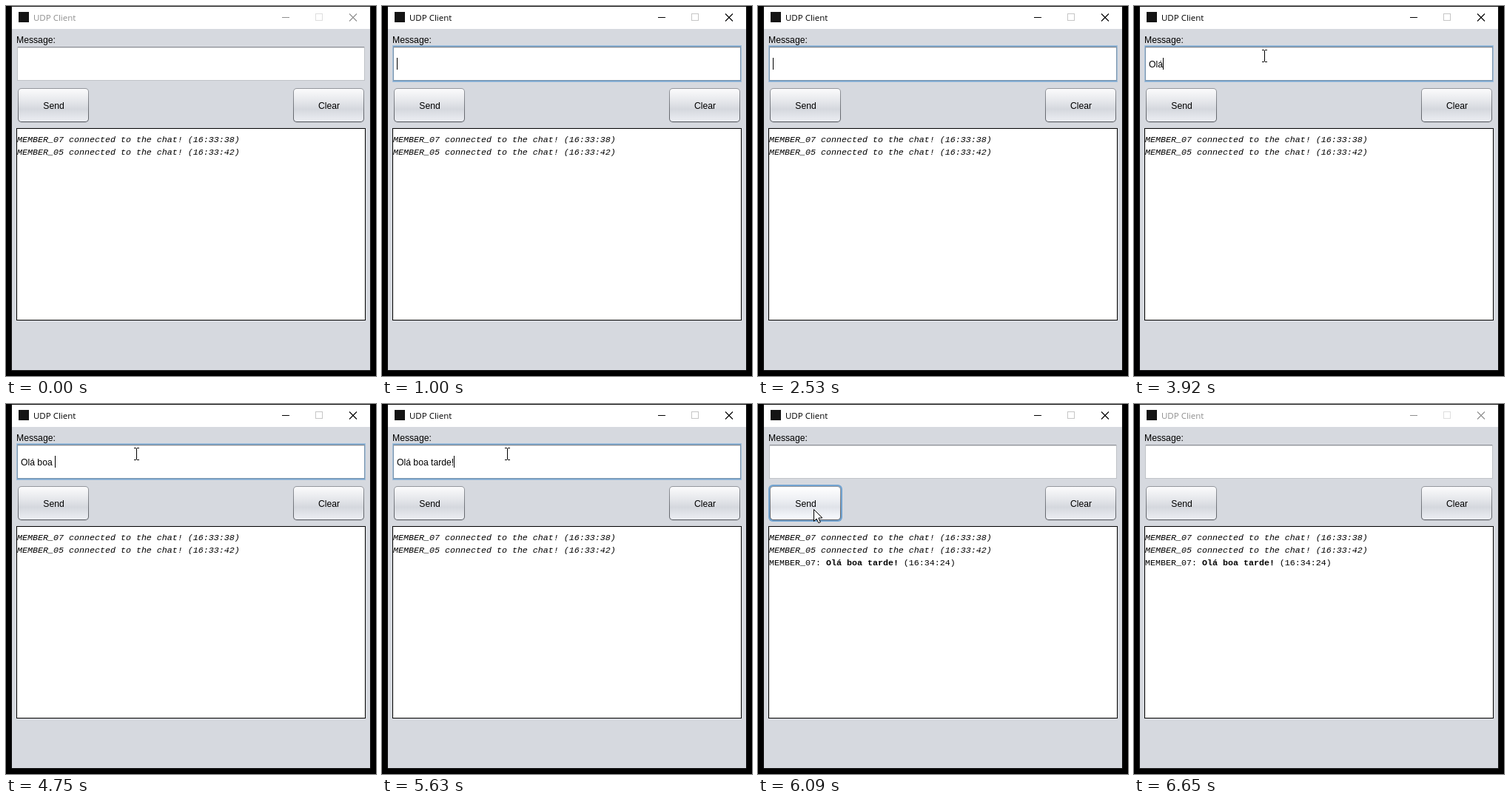
Recreate the animation shown at these times as an HTML page with a canvas. Size 500x500 px, loop 8 s.

```html
<!DOCTYPE html>
<html lang="en">
<head>
<meta charset="utf-8">
<title>UDP Client</title>
<style>
  html, body { margin: 0; width: 100%; height: 100%; overflow: hidden; background: #000; }
  canvas { display: block; width: 500px; height: 500px; }
</style>
</head>
<body>
<canvas id="stage" width="500" height="500"></canvas>
<script>
const ctx = document.getElementById('stage').getContext('2d');
const LOOP = 8000;
const SANS = '12.2px "Liberation Sans", Arial, sans-serif';
const MONO = '11.66px "Liberation Mono", "Courier New", monospace';
const TITLE = '11.5px "Open Sans", "Noto Sans", sans-serif';
const MESSAGE = 'Olá boa tarde!';

// [time, value...] steps; each holds until the next one
const ACTIVE = [[0, false], [1000, true], [1170, false], [2530, true], [6650, false]];
const FOCUS = [[0, 'field'], [5900, 'send']];
const TYPED = [[0, 0], [3530, 1], [3720, 2], [3920, 3], [4380, 4], [4470, 5], [4560, 6], [4650, 7],
  [4730, 8], [4820, 10], [4910, 11], [5000, 12], [5370, 13], [5550, 14], [6020, 0]];
const SEND = [[0, 'normal'], [5900, 'pressed'], [6020, 'hover'], [6180, 'normal']];
const POINTER = [[0, null],
  [1630, 'arrow', 397, 303], [1740, 'arrow', 455, 324], [1830, 'arrow', 424, 284],
  [1910, 'arrow', 358, 230], [2000, 'arrow', 296, 182], [2090, null],
  [2630, 'beam', 226, 84], [2720, 'beam', 208, 78], [2810, 'beam', 192, 72],
  [2900, 'beam', 181, 68], [2990, 'beam', 176, 67],
  [5630, 'beam', 169, 67], [5720, 'beam', 146, 84], [5810, 'arrow', 100, 122],
  [5900, 'arrow', 75, 142], [6100, 'arrow', 80, 146], [6180, null]];

const FACES = {
  normal: ['#fbfbfc', '#e4e6ea', '#d5d8de', '#eceef3'],
  hover: ['#ffffff', '#edeff3', '#e0e3e9', '#f9fbff'],
  pressed: ['#b9bfcb', '#a4abb9', '#99a1b0', '#b3bbc9']
};

function at(steps, t) {
  let found = steps[0];
  for (const step of steps) if (step[0] <= t) found = step;
  return found;
}

function rect(x, y, w, h, color) {
  ctx.fillStyle = color;
  ctx.fillRect(x, y, w, h);
}

function frame(x, y, w, h, color) {
  ctx.strokeStyle = color;
  ctx.lineWidth = 1;
  ctx.strokeRect(x + 0.5, y + 0.5, w - 1, h - 1);
}

function text(str, x, y, font, color = '#000', align = 'left') {
  ctx.font = font;
  ctx.fillStyle = color;
  ctx.textAlign = align;
  ctx.fillText(str, x, y);
}

function gradient(y0, y1, stops) {
  const g = ctx.createLinearGradient(0, y0, 0, y1);
  for (const [pos, color] of stops) g.addColorStop(pos, color);
  return g;
}

function rounded(x, y, w, h, r, fill) {
  ctx.beginPath();
  ctx.roundRect(x, y, w, h, r);
  ctx.fillStyle = fill;
  ctx.fill();
}

function drawWindow(active) {
  rect(0, 0, 500, 500, '#000');
  frame(7, 0, 486, 493, active ? '#0c0c0c' : '#1c1c1c');
  rect(8, 1, 484, 491, '#d6d9df');
  rect(8, 1, 484, 30, '#fff');
  rect(17, 8, 14, 14, '#141414');
  const ink = active ? '#000' : '#8f8f8f';
  text('UDP Client', 37, 20, TITLE, ink);
  rect(373, 15, 10, 1, ink);
  frame(418, 10, 10, 10, active ? '#c6c6c6' : '#dedede');
  ctx.strokeStyle = ink;
  ctx.lineWidth = 1.1;
  ctx.beginPath();
  ctx.moveTo(464, 10.5);
  ctx.lineTo(474, 20.5);
  ctx.moveTo(474, 10.5);
  ctx.lineTo(464, 20.5);
  ctx.stroke();
}

function drawField(str, focused, caret) {
  text('Message:', 14, 50, SANS);
  if (focused) {
    rect(14, 53, 472, 50, '#a3bfd9');
    rect(15, 54, 470, 48, '#73a4d1');
  }
  rect(15, 55, 470, 46, focused ? '#8097ad' : '#c0c3c8');
  rect(16, 55, 468, 1, '#8b8e94');
  rect(16, 56, 468, 44, '#fff');
  rect(16, 56, 468, 1, '#dcdde0');
  text(str, 20, 83, SANS);
  if (caret) rect(20 + Math.round(ctx.measureText(str).width), 70, 1, 16, '#000');
}

function drawButton(label, x, state, focused) {
  const y = 111, w = 96, h = 46, face = FACES[state], down = state === 'pressed';
  if (focused) rounded(x - 2, y - 2, w + 4, h + 4, 6, '#73a4d1');
  else rounded(x, y + 1, w, h, 5, '#c3c6cc');
  rounded(x, y, w, h, 5, down
    ? gradient(y, y + h, [[0, '#1c222c'], [1, '#5b6370']])
    : gradient(y, y + h, [[0, '#95989e'], [1, '#5a5d63']]));
  rounded(x + 1, y + 1, w - 2, h - 2, 4, gradient(y + 1, y + h - 1,
    [[0, face[0]], [0.4, face[1]], [0.62, face[2]], [1, face[3]]]));
  text(label, x + w / 2 + 0.5, 139, SANS, '#000', 'center');
}

function drawChat(sent) {
  rect(14, 165, 472, 260, '#000');
  rect(15, 166, 470, 258, '#fff');
  text('MEMBER_07 connected to the chat! (16:33:38)', 15, 184, 'italic ' + MONO);
  text('MEMBER_05 connected to the chat! (16:33:42)', 15, 201, 'italic ' + MONO);
  if (!sent) return;
  let x = 15;
  for (const [str, style] of [['MEMBER_07: ', ''], [MESSAGE, 'bold '], [' (16:34:24)', '']]) {
    text(str, x, 218, style + MONO);
    x += ctx.measureText(str).width;
  }
}

function drawArrow(x, y) {
  ctx.beginPath();
  ctx.moveTo(x + 0.5, y + 0.5);
  for (const [dx, dy] of [[0, 16], [3.6, 12.6], [6.4, 18.2], [8.8, 17.2], [6.3, 11.6], [11.4, 11.4]])
    ctx.lineTo(x + 0.5 + dx, y + 0.5 + dy);
  ctx.closePath();
  ctx.fillStyle = '#fff';
  ctx.fill();
  ctx.strokeStyle = '#000';
  ctx.lineWidth = 1;
  ctx.stroke();
}

function drawBeam(x, y) {
  rect(x, y - 7, 1, 15, '#000');
  for (const dy of [-8, 8]) {
    rect(x - 3, y + dy, 3, 1, '#000');
    rect(x + 1, y + dy, 3, 1, '#000');
  }
}

function draw(t) {
  const active = at(ACTIVE, t)[1];
  const focus = active ? at(FOCUS, t)[1] : '';
  const fieldFocus = focus === 'field';
  const caretOn = fieldFocus && (t < 3070 || t >= 3530);
  drawWindow(active);
  drawField(MESSAGE.slice(0, at(TYPED, t)[1]), fieldFocus, caretOn);
  drawButton('Send', 16, at(SEND, t)[1], focus === 'send');
  drawButton('Clear', 388, 'normal', false);
  drawChat(t >= 6020);
  const [, kind, x, y] = at(POINTER, t);
  if (kind === 'arrow') drawArrow(x, y);
  if (kind === 'beam') drawBeam(x, y);
}

const start = performance.now();
function tick() {
  draw((performance.now() - start) % LOOP);
  requestAnimationFrame(tick);
}
tick();
</script>
</body>
</html>
```
